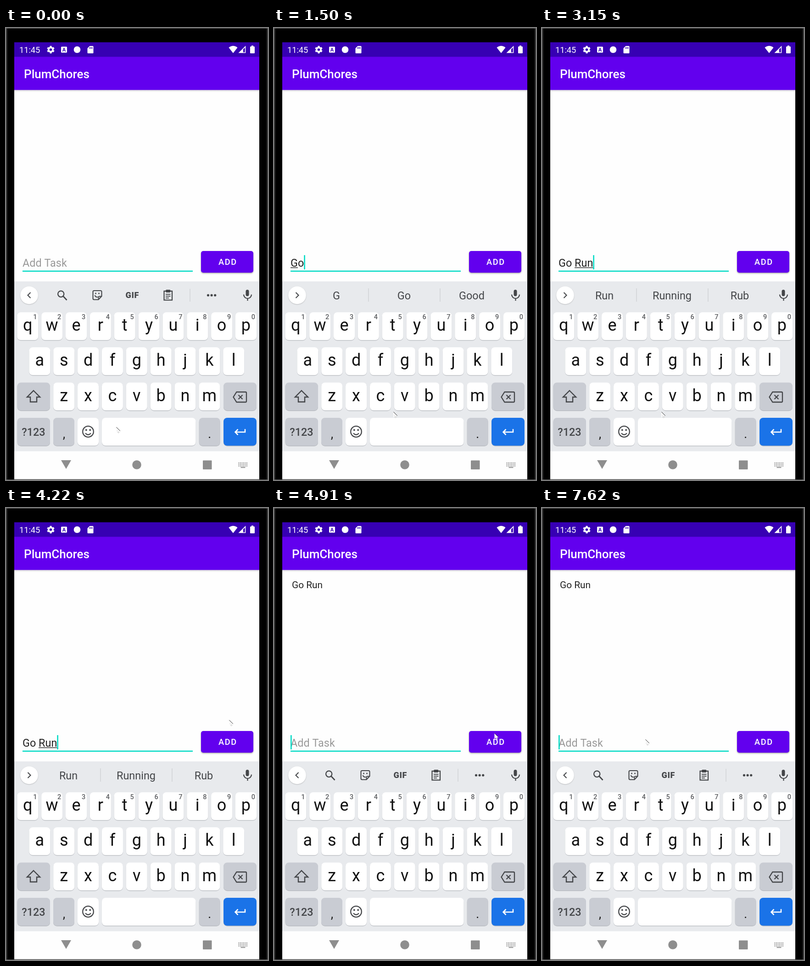
An HTML page with a canvas for the animation above (8000 ms loop, 571 px wide and 981 px high).

```html
<!DOCTYPE html>
<html lang="en">
<head>
<meta charset="utf-8">
<title>Task list demo</title>
<style>
html, body { margin: 0; width: 100%; height: 100%; overflow: hidden; background: #000; }
canvas { display: block; width: 571px; height: 981px; }
</style>
</head>
<body>
<canvas id="stage"></canvas>
<script>
const W = 571, H = 981, LOOP = 8000;
const canvas = document.getElementById('stage');
const c = canvas.getContext('2d');
const dpr = window.devicePixelRatio || 1;
canvas.width = W * dpr;
canvas.height = H * dpr;

const PURPLE = '#6200ee', TEAL = '#03dac5', INK = '#444649', KEY_GREY = '#c9ccd3';
const FIELD_X = 36, FIELD_SIZE = 23.4;

// Timelines: [start time in ms, value]
const typed = [[0, ''], [1220, 'G'], [1500, 'Go'], [1810, 'Go '], [2330, 'Go R'],
  [2760, 'Go Ru'], [3030, 'Go Run'], [4640, '']];
const composing = [[0, null], [1500, [0, 1]], [1810, [0, 2]], [1960, null],
  [2480, [3, 4]], [2910, [3, 5]], [3150, [3, 6]], [4640, null]];
const hints = [[0, ''], [1500, 'G Go Good'], [1810, 'Go Good Got'], [1960, 'run to get'],
  [2480, 'R Run Running'], [2910, 'Ru Run Rub'], [3150, 'Run Running Rub'], [4760, '']];
const caretOn = [[0, 0], [150, 1], [570, 0], [1100, 1], [3710, 0], [4100, 1],
  [5160, 0], [5580, 1], [6140, 0], [6530, 1], [7060, 0], [7620, 1]];
const pointer = [[0, [240, 866]], [150, [242, 864]], [300, [250, 850]], [420, [261, 833]],
  [570, [260, 833]], [3710, [285, 785]], [3830, [350, 685]], [3950, [416, 576]],
  [4100, [490, 428]], [4220, [486, 460]], [4370, [480.5, 489]], [5160, [356, 515]],
  [5310, [282, 518]], [5430, [238, 518]], [5580, [229, 517]], [6260, [220, 513]],
  [6380, [213, 507]], [7310, [225, 502]]];
const press = [[0, 0], [4520, 0.14], [4640, 0.25], [4760, 0.16], [4910, 0]];
const itemAlpha = [[0, 0], [4640, 0.06], [4760, 1]];

function at(list, t) {
  let value = list[0][1];
  for (const [start, v] of list) if (t >= start) value = v;
  return value;
}

function rect(x, y, w, h, fill) {
  c.fillStyle = fill;
  c.fillRect(x, y, w, h);
}

function round(x, y, w, h, r, fill) {
  c.beginPath();
  c.roundRect(x, y, w, h, r);
  c.fillStyle = fill;
  c.fill();
}

function disc(x, y, r, fill) {
  c.beginPath();
  c.arc(x, y, r, 0, 7);
  c.fillStyle = fill;
  c.fill();
}

function ring(x, y, r, width, color) {
  c.beginPath();
  c.arc(x, y, r, 0, 7);
  c.lineWidth = width;
  c.strokeStyle = color;
  c.stroke();
}

function fillPath(d, fill) {
  c.fillStyle = fill;
  c.fill(new Path2D(d));
}

function strokePath(d, color, width) {
  c.strokeStyle = color;
  c.lineWidth = width;
  c.stroke(new Path2D(d));
}

function setFont(size, weight = 400) {
  c.font = `${weight} ${size}px Roboto, sans-serif`;
}

function text(s, x, y, size, color, align = 'left', weight = 400) {
  setFont(size, weight);
  c.textAlign = align;
  c.fillStyle = color;
  c.fillText(s, x, y);
}

function shadow(color, blur, dy) {
  c.shadowColor = color;
  c.shadowBlur = blur * dpr;
  c.shadowOffsetY = dy * dpr;
}

function noShadow() {
  c.shadowColor = 'transparent';
}

function drawDevice() {
  rect(0, 0, W, H, '#000');
  rect(1, 1, 3, H - 2, '#161616');
  rect(567, 1, 3, H - 2, '#161616');
  c.strokeStyle = '#6c6c6c';
  c.lineWidth = 1;
  c.strokeRect(0.5, 0.5, W - 1, H - 1);
  rect(18, 31, 534, 948.5, '#fefefe');
}

function drawStatusBar() {
  rect(18, 31, 534, 31.5, '#3700b3');
  text('11:45', 29, 54, 18.2, '#fff');

  ring(97.5, 47, 4.6, 3.6, '#fff');
  for (let i = 0; i < 6; i++) {
    c.save();
    c.translate(97.5, 47);
    c.rotate(i * Math.PI / 3 + Math.PI / 6 * 3);
    rect(5, -2, 3.2, 4, '#fff');
    c.restore();
  }

  round(120, 40.5, 13, 13, 1.5, '#fff');
  text('A', 126.5, 51, 11, '#3700b3', 'center', 700);
  disc(155, 47, 7.3, '#fff');
  fillPath('M182.5 39H189q1.5 0 1.5 1.5V53.500q0 1.5-1.5 1.500H179q-1.500 0-1.500-1.500V44z', '#fff');
  for (let i = 0; i < 3; i++) rect(181.700 + i * 2.6, 41.5, 1.4, 3.5, '#3700b3');

  fillPath('M495 54.500L485.500 42.500Q495 35 504.500 42.500z', '#fff');
  strokePath('M508.500 53.500H521.500V40.500z', '#fff', 1.6);
  fillPath('M507 54H517V45z', '#fff');
  round(532, 40, 10, 15, 1.5, '#fff');
  rect(535, 38, 4, 3, '#fff');
}

function drawAppBar() {
  const fade = c.createLinearGradient(0, 134, 0, 139);
  fade.addColorStop(0, 'rgba(0,0,0,.16)');
  fade.addColorStop(1, 'rgba(0,0,0,0)');
  rect(18, 134, 534, 5, fade);
  rect(18, 62, 534, 72.5, PURPLE);
  text('PlumChores', 39, 108.5, 26, '#fff', 'left', 500);
}

function drawField(t) {
  const value = at(typed, t);
  if (value) text(value, FIELD_X, 518, FIELD_SIZE, '#212121');
  else text('Add Task', FIELD_X, 518, FIELD_SIZE, '#999');

  setFont(FIELD_SIZE);
  const endOf = n => FIELD_X + c.measureText(value.slice(0, n)).width;
  const span = at(composing, t);
  if (span) rect(endOf(span[0]), 519.6, endOf(span[1]) - endOf(span[0]), 1.4, '#212121');

  rect(FIELD_X, 526.5, 371, 2.5, TEAL);
  if (at(caretOn, t)) rect(endOf(value.length), 493, 2.6, 31, TEAL);
}

function drawButton(t) {
  const p = at(press, t);
  shadow('rgba(0,0,0,.36)', p ? 7 : 3, p ? 3 : 1.5);
  round(425, 484, 114, 47, 5, PURPLE);
  noShadow();
  if (p) round(425, 484, 114, 47, 5, `rgba(255,255,255,${p})`);
  c.letterSpacing = '1.62px';
  text('ADD', 463, 514, 18.2, '#fff', 'left', 500);
  c.letterSpacing = '0px';
}

function drawMic() {
  round(522.5, 568, 7, 14, 3.5, INK);
  strokePath('M518 578.500a8.500 8.500 0 0 0 17 0M526.500 587v5', INK, 2.2);
}

function drawTools() {
  ring(119.7, 577.2, 6.6, 2.3, INK);
  strokePath('M124.500 582L132.500 590.500', INK, 2.6);

  strokePath('M192 570H206q2.500 0 2.500 2.500V582L201.500 589.500H192q-2.500 0-2.500-2.500V572.500q0-2.500 2.500-2.500z', INK, 2.1);
  strokePath('M208 582.500H203.500q-2 0-2 2V589M193.500 580q2.500 5.500 7 3.500', INK, 1.9);
  disc(195.500, 576, 1.5, INK);
  disc(202.500, 576, 1.5, INK);

  c.letterSpacing = '0.6px';
  text('GIF', 275.3, 586, 18, INK, 'center', 900);
  c.letterSpacing = '0px';

  c.strokeStyle = INK;
  c.lineWidth = 2.2;
  c.strokeRect(344.500, 571, 17.500, 19.500);
  round(348, 568, 10.5, 6, 2, INK);
  for (let i = 0; i < 3; i++) rect(348, 577 + i * 4, i < 2 ? 10.5 : 7, 1.8, INK);

  rect(400.5, 566, 1, 28, '#c8cacd');
  for (let i = 0; i < 3; i++) disc(440.5 + i * 7.6, 580, 2.6, INK);
}

function drawSuggestions(words) {
  words.split(' ').forEach((word, i) => {
    text(word, 136 + i * 147.5, 589, FIELD_SIZE, INK, 'center');
  });
  rect(205.500, 565, 1, 29, '#c4c6c9');
  rect(361.500, 565, 1, 29, '#c4c6c9');
}

function drawStrip(t) {
  const words = at(hints, t);
  shadow('rgba(0,0,0,.2)', 2, 1);
  disc(50.5, 580, 19.3, '#fff');
  noShadow();
  if (words) {
    strokePath('M47.500 574L53.500 580L47.500 586', INK, 2.1);
    drawSuggestions(words);
  } else {
    strokePath('M53.500 574L47.500 580L53.500 586', INK, 2.1);
    drawTools();
  }
  drawMic();
}

function key(x, y, w, fill) {
  round(x, y + 1.2, w, 60.5, 8, '#b4b7bd');
  round(x, y, w, 60.5, 8, fill);
}

function drawLetters(letters, x, y, numbered) {
  [...letters].forEach((letter, i) => {
    const mid = x + i * 52.85;
    key(mid - 23, y, 46, '#fff');
    text(letter, mid, y + 40.3, 36, '#111', 'center');
    if (numbered) text((i + 1) % 10, mid + 16, y + 15, 14.5, '#5b5d60', 'center', 500);
  });
}

function drawKeyboard() {
  rect(18, 550, 534, 368.5, '#e8eaed');
  drawLetters('qwertyuiop', 47.3, 617, true);
  drawLetters('asdfghjkl', 73.4, 693);
  drawLetters('zxcvbnm', 126.2, 769.5);

  key(24.500, 769.5, 71.5, KEY_GREY);
  strokePath('M60 787L74 801H67V811.500H53V801H46z', INK, 2.4);
  key(474, 769.5, 72, KEY_GREY);
  strokePath('M502.500 790H522q2 0 2 2V810q0 2-2 2H502.500L495.500 801z', INK, 2.3);
  strokePath('M506.500 796.500L515.500 805.500M515.500 796.500L506.500 805.500', INK, 2.3);

  const y = 846;
  key(24.500, y, 71.5, KEY_GREY);
  text('?123', 60, 885, 23.4, INK, 'center', 500);
  key(103, y, 46, KEY_GREY);
  text(',', 126.5, 890, 28, '#222', 'center');
  key(156, y, 46, '#fff');
  ring(179, 876, 11.8, 2.3, INK);
  disc(174.8, 872.5, 1.9, INK);
  disc(183.2, 872.5, 1.9, INK);
  strokePath('M173 879.500q6 6.500 12 0', INK, 2.3);
  key(209, y, 204.5, '#fff');
  key(420.7, y, 46, KEY_GREY);
  text('.', 443.7, 890, 28, '#222', 'center');
  key(474, y, 72, '#1a73e8');
  strokePath('M521 870.500V877H499.500M505.500 871L499.500 877L505.500 883', '#fff', 2.5);
}

function drawNavBar() {
  const grey = '#8e8e8e';
  fillPath('M120 938H142L131 957z', grey);
  disc(285, 948, 9.8, grey);
  round(429, 938.5, 19.5, 19.5, 1, grey);
  for (let row = 0; row < 3; row++)
    for (let i = 0; i < 6; i++) rect(506.5 + i * 3.5, 943 + row * 3.3, 2, 2, grey);
  rect(511.5, 952.700, 10, 2, grey);
}

function drawPointer(t) {
  const [x, y] = at(pointer, t);
  c.save();
  c.translate(x, y);
  fillPath('M0 0V12L3 9.500L5 14L7 13L5.200 9H9z', '#fff');
  strokePath('M0.500 0.300L8.700 8.500', '#222', 1);
  strokePath('M1.500 8.500L3.200 7.500M3.300 10L5 13.500M5.500 9.500L6.800 12.500', '#aaa', 0.8);
  c.restore();
}

function draw(t) {
  c.setTransform(dpr, 0, 0, dpr, 0, 0);
  drawDevice();
  drawAppBar();
  drawStatusBar();
  c.globalAlpha = at(itemAlpha, t);
  text('Go Run', 39, 174, 20.8, '#212121');
  c.globalAlpha = 1;
  drawField(t);
  drawButton(t);
  drawKeyboard();
  drawStrip(t);
  drawNavBar();
  drawPointer(t);
}

const begin = performance.now();
function tick() {
  draw((performance.now() - begin) % LOOP);
  requestAnimationFrame(tick);
}
tick();
</script>
</body>
</html>
```
